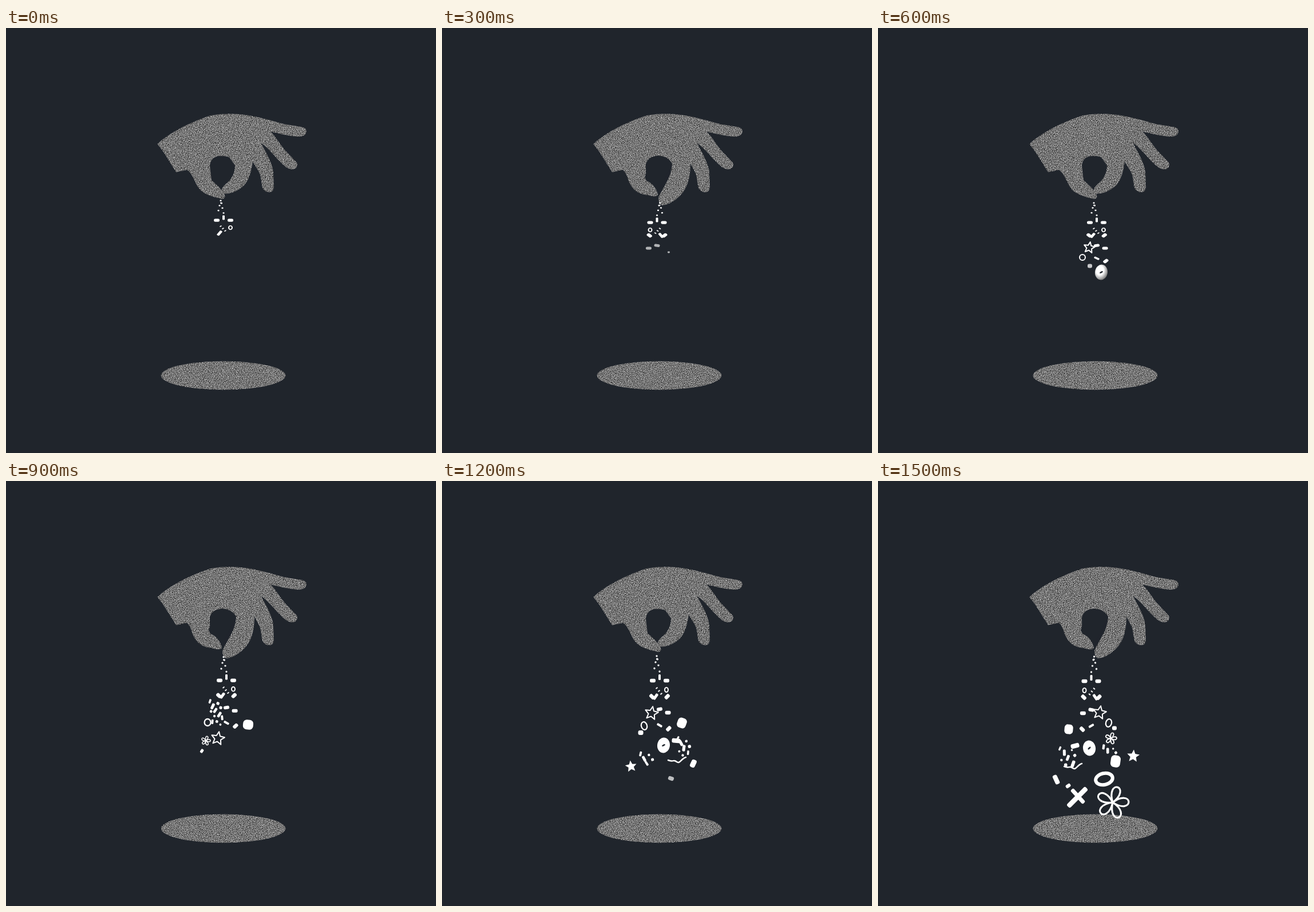
These frames come from a looping animation (753 px wide and 743 px high, 1.8 s). An HTML page:

```html
<!DOCTYPE html>
<html lang="en">
<head>
<meta charset="utf-8">
<title>Sprinkling hand</title>
<style>
  html, body { margin: 0; width: 100%; height: 100%; overflow: hidden; background: #20252c; }
  svg { display: block; width: 100%; height: 100%; }
</style>
</head>
<body>
<svg viewBox="0 0 753 743">
  <defs>
    <filter id="grain" filterUnits="userSpaceOnUse" x="260" y="140" width="275" height="500" color-interpolation-filters="sRGB">
      <feTurbulence id="noise" type="fractalNoise" baseFrequency="0.83" numOctaves="2" result="n"/>
      <feColorMatrix in="n" values="1.3 0 0 0 -.19  1.3 0 0 0 -.19  1.3 0 0 0 -.19  0 0 0 0 1"/>
      <feComposite in2="SourceGraphic" operator="in"/>
    </filter>
    <radialGradient id="ball" cx=".38" cy=".4" r=".65">
      <stop offset=".45" stop-color="#fff"/><stop offset="1" stop-color="#777"/>
    </radialGradient>
  </defs>
  <g filter="url(#grain)">
    <path id="hand" fill-rule="evenodd"/>
    <ellipse cx="380.5" cy="607.5" rx="109" ry="25"/>
  </g>
  <path id="shade" d="M403 237C401 254 394 264 380 290L380 280C390 267 394 250 403 237Z" fill="#20252c" opacity=".5"/>
  <g id="pieces" fill="#fff" stroke-linejoin="round" stroke-linecap="round"></g>
</svg>
<script>
const STEP = 300;
const $ = id => document.getElementById(id);
const repeat = (n, make) => Array.from({length: n}, (_, i) => make(i)).join('');

// Pieces
const rod = (x, y, w, h = w, a = 0) =>
  `<rect x="${-w / 2}" y="${-h / 2}" width="${w}" height="${h}" rx="${Math.min(w, h) * .38}" transform="translate(${x} ${y}) rotate(${a})"/>`;
const outlined = (d, w = 2) => `<path d="${d}" fill="none" stroke="#fff" stroke-width="${w}"/>`;
const solid = d => `<path d="${d}"/>`;
const ring = (x, y, rx, ry, w = 2, a = 0) =>
  `<ellipse rx="${rx}" ry="${ry}" fill="none" stroke="#fff" stroke-width="${w}" transform="translate(${x} ${y}) rotate(${a})"/>`;
const star = (x, y, r, a) => 'M' + Array.from({length: 10}, (_, i) => {
  const t = (a + i * 36) * Math.PI / 180, q = i % 2 ? r * .46 : r;
  return `${x + q * Math.sin(t)} ${y - q * Math.cos(t)}`;
}).join('L') + 'Z';
const flower = (x, y, r, w) => repeat(5, i =>
  `<path d="M0 0C${-r * .42} ${-r * .6} ${-r * .25} ${-r} 0 ${-r}S${r * .42} ${-r * .6} 0 0Z" fill="none" stroke="#fff" stroke-width="${w}" transform="translate(${x} ${y}) rotate(${18 + i * 70})"/>`);
const donut = (x, y, a, fill = '#fff') =>
  `<g transform="translate(${x} ${y}) rotate(${a})"><ellipse rx="11" ry="13.5" fill="${fill}"/><ellipse rx="3.2" ry="1.4" fill="#20252c" transform="rotate(-35)"/></g>`;
const wave = (x, y) => outlined(`M${x - 17} ${y}c9 4 10 -2 15 3c6 4 8 -6 16 -8`, 2.5);
const faded = (body, o) => `<g opacity="${o}">${body}</g>`;

// Crumbs zigzag out of the fingers, then chips fall in three lanes that spread with each row
const crumbs = repeat(6, k =>
  rod(376 + (k % 2 ? k : -k), 306 + k * 5.4, k == 1 ? 4 : 3, 3.2, k * 30));
const slivers = ring(393, 365, 3, 4) + rod(374, 377, 12, 5, -55) +
  repeat(3, k => rod(380 + (k - 1) * 4, 362 + k * 5, 4, 2, -40));
const row = r => [-1, 0, 1].map(lane => {
  if (lane < 0 && r > 1 || !lane && r == 1) return '';
  const x = 381 + lane * (12 + r * 1.3);
  const y = 349 + r * 28 - (lane ? 0 : 6);
  return lane ? rod(x, y, 10, 6.5, r % 2 ? -45 * lane : 0) : rod(x, y, 4 + r % 3, 10, r * 40);
}).join('');
const stream = ({rows, side = 1, stretch = 1, x = 0, y = 0, last = 1}) =>
  `<g transform="matrix(${side} 0 0 ${stretch} ${x} ${y})">${crumbs + slivers +
    repeat(rows, r => faded(row(r), r == rows - 1 ? last : 1))}</g>`;

// Loose confetti inside a box, seeded so every loop is the same
function scatter(count, seed, left, top, width, height) {
  const random = () => (seed = seed * 16807 % 2147483647) / 2147483647;
  random();
  return repeat(count, i => {
    const x = left + width * ((i * .618 + random() * .1) % 1);
    const y = top + height * (i + random()) / count;
    const size = 3 + random() * 3;
    return rod(x, y, size, i % 2 ? size : size * 2.2, random() * 80 - 40);
  });
}

const scenes = [
  stream({rows: 1, stretch: .8, y: 57}),

  stream({rows: 3, side: -1, stretch: .8, x: 757.5, y: 61, last: .65}) + faded(rod(397, 392, 4, 3), .65),

  stream({rows: 4, stretch: .8, x: 2, y: 61}) + outlined(star(370, 384, 10, 10)) +
    ring(358, 401, 5, 5) + faded(rod(371, 416, 8, 7), .75) + donut(391, 427, 8, 'url(#ball)'),

  stream({rows: 4, stretch: .95, x: 5, y: 17}) + scatter(12, 7, 355, 384, 24, 44) +
    ring(353, 422, 5.5, 6, 2.3) + rod(424, 426, 18, 17, 5) + flower(350, 454, 8, 1.5) +
    outlined(star(371, 450, 12, 10)) + rod(343, 472, 5, 7, 35),

  stream({rows: 4}) + outlined(star(367, 406, 12, 10)) + ring(354, 428, 5, 7, 2.2, -15) +
    rod(348, 440, 9, 8) + rod(420, 423, 16, 18, 20) + donut(388, 462, 8) + rod(410, 454, 15, 8, 5) +
    scatter(8, 11, 412, 448, 24, 36) + scatter(5, 5, 346, 474, 26, 20) + wave(413, 488) +
    rod(440, 494, 9, 14, 25) + solid(star(331, 499, 10.5, -8)) + faded(rod(401, 520, 10, 7, 20), .7),

  stream({rows: 4, side: -1, x: 754.5, y: 1}) + outlined(star(388, 405, 12, 10)) +
    ring(404, 423, 5, 7, 2.2, 15) + rod(414, 432, 8, 7) + rod(334, 434, 15, 17, 5) +
    flower(408, 450, 10, 1.8) + donut(370, 467, -10) + rod(345, 463, 15, 8, -15) +
    scatter(8, 9, 318, 464, 30, 36) + scatter(4, 3, 394, 464, 26, 14) + wave(343, 499) +
    rod(416, 490, 17, 21, 8) + solid(star(447, 481, 11.5, 5)) + rod(312, 522, 8, 17, -25) +
    ring(396, 521, 15, 10, 6, -12) + rod(333, 533, 9, 6, -35) +
    rod(349, 553, 8.5, 46, 45) + rod(350, 551, 7, 32, -42) + flower(411, 562, 28, 3.2)
];

// Hand: shared outline, then index finger, thumb and hole for the closed and open pinch
const outline = 'M298 252C288 237 276 215 265 203C286 183 322 165 358 153Q383 148 411 151C440 154 465 162 487 168L518 173Q527 175 526 182Q524 190 512 190C497 189 480 185 463 181C472 189 481 205 489 214L509 235Q512 241 506 246Q499 249 490 243C475 231 465 215 447 201C452 213 465 232 468 250L469 278Q468 288 460 287Q452 286 449 279C446 265 447 258 442 250';
const pinches = [
  'L432 234C430 247 427 265 416 276Q400 290 382 290Q386 297 379 299C362 295 345 291 337 279C330 269 327 255 317 248Z' +
  'M357 241Q358 227 371 224Q384 223 391 226L401 240C401 252 397 262 387 271C381 276 378 279 378 284C373 277 366 272 360 266C359 258 358 250 357 241Z',
  'L435 237C435 262 430 281 415 295Q400 309 385 310Q379 308 379 296C390 274 402 260 403 237Q396 224 378 223Q360 225 357 238L357 254L355 261L358 267C370 272 376 282 378 291Q377 297 360 292C341 290 333 281 327 268Q323 253 317 248Z'
];

let shown = -1;
function draw(time) {
  const i = Math.floor(time / STEP) % scenes.length;
  if (i === shown) return;
  shown = i;
  $('hand').setAttribute('d', outline + pinches[i % 2]);
  $('noise').setAttribute('seed', 3 + i % 4 * 7 + (i > 4 ? 30 : 0));
  $('shade').setAttribute('visibility', i % 2 ? 'visible' : 'hidden');
  $('pieces').innerHTML = scenes[i];
}

const start = performance.now();
function tick() {
  draw(performance.now() - start);
  requestAnimationFrame(tick);
}
tick();
</script>
</body>
</html>
```
